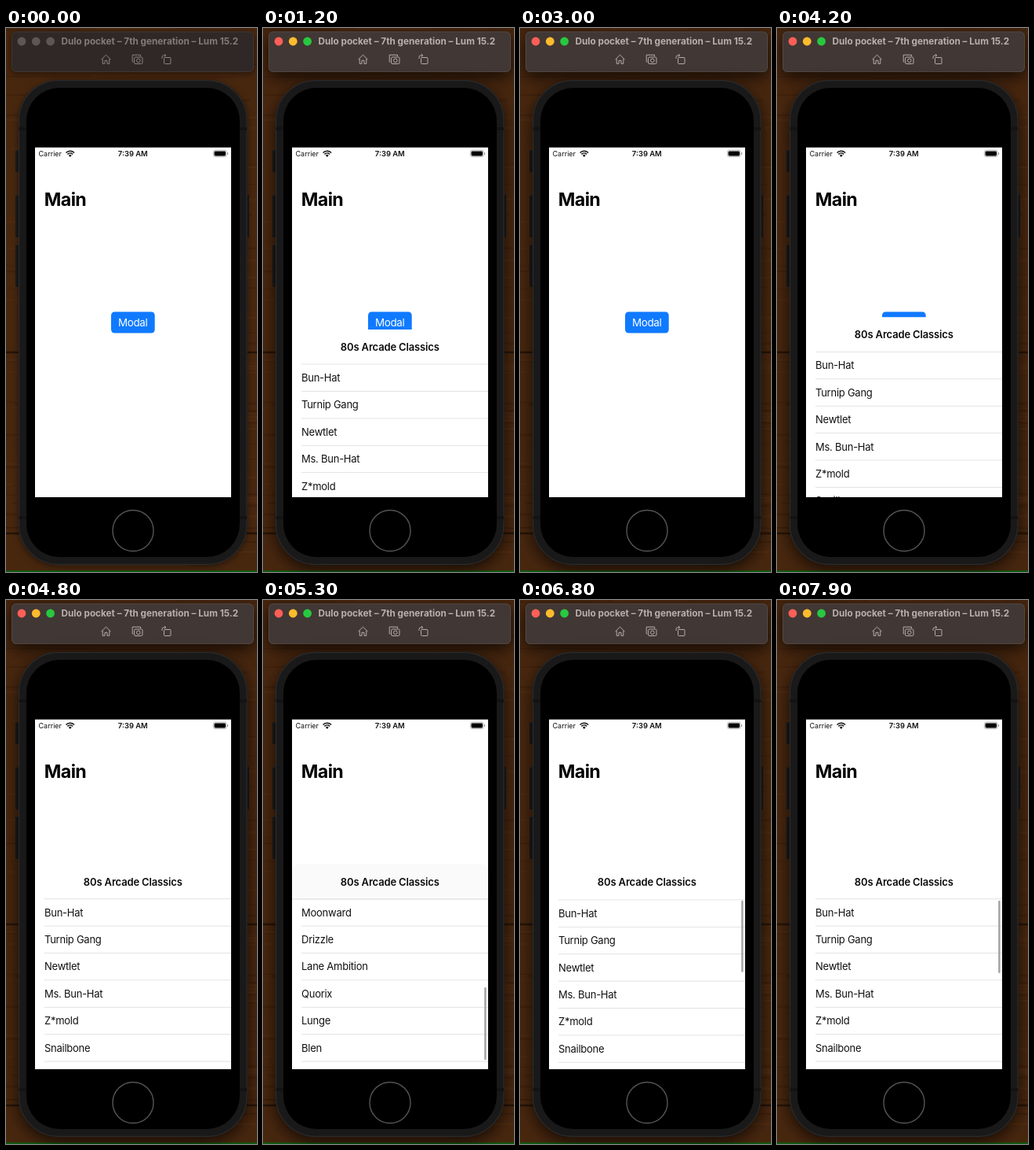
An HTML page with a canvas for the animation above (8 s loop, 320 by 691 pixels).

```html
<!DOCTYPE html>
<html lang="en">
<head>
<meta charset="utf-8">
<title>Modal sheet</title>
<style>
html, body { margin: 0; width: 100%; height: 100%; overflow: hidden; background: #000; }
canvas { display: block; width: 320px; height: 691px; }
</style>
</head>
<body>
<canvas id="stage"></canvas>
<script>
const W = 320, H = 691, LOOP = 8000, STEP = 100;
const SCREEN = { x: 37, y: 151.5, w: 250, h: 444.5 };
const BOTTOM = SCREEN.y + SCREEN.h;
const SHEET_TOP = 335.5, LIST_TOP = 379.7, ROW = 34.4;
const FONT = 'Inter, "Open Sans", sans-serif';
const ROWS = ['Bun-Hat', 'Turnip Gang', 'Newtlet', 'Ms. Bun-Hat', 'Z*mold', 'Snailbone',
  'Gravel Run', 'Bog Lantern', 'Moonward', 'Drizzle', 'Lane Ambition', 'Quorix', 'Lunge', 'Blen', 'Mud Nub'];
const MAX_SCROLL = ROWS.length * ROW - (BOTTOM - LIST_TOP) + 1;

// [time, list offset]
const SCROLL = [[4900, 0], [5000, 40], [5100, 150], [5200, 231], [5300, 275.2], [5400, 293],
  [5550, MAX_SCROLL], [6000, MAX_SCROLL], [6100, 270], [6200, 200], [6300, 118], [6400, 40],
  [6500, -12], [6600, -7], [6700, -3], [6800, -1.2], [7000, 0]];

const canvas = document.getElementById('stage');
const ratio = window.devicePixelRatio || 1;
canvas.width = W * ratio;
canvas.height = H * ratio;
const c = canvas.getContext('2d');
c.scale(ratio, ratio);

function track(keys, t) {
  if (t <= keys[0][0]) return keys[0][1];
  for (let i = 1; i < keys.length; i++) {
    const [t0, a] = keys[i - 1], [t1, b] = keys[i];
    if (t <= t1) return a + (b - a) * (t - t0) / (t1 - t0);
  }
  return keys[keys.length - 1][1];
}

// Remaining share of a critically damped spring
function spring(ms) {
  const k = Math.max(0, ms) * 0.0104;
  return ms > 680 ? 0 : (1 + k) * Math.exp(-k);
}

function sheetShift(t) {
  const travel = BOTTOM - SHEET_TOP;
  if (t < 2100) return travel * spring(t - 900);
  if (t < 3000) {
    const p = (t - 2100) / 900;
    return travel * p * p * (3 - 2 * p);
  }
  return travel * spring(t - 3850);
}

function box(x, y, w, h, r, fill) {
  c.beginPath();
  c.roundRect(x, y, w, h, r);
  if (fill) { c.fillStyle = fill; c.fill(); }
}

function disc(x, y, r, fill) {
  c.beginPath();
  c.arc(x, y, r, 0, Math.PI * 2);
  c.fillStyle = fill;
  c.fill();
}

function text(str, x, base, size, weight, color, spacing = 0, align = 'left') {
  c.font = `${weight} ${size}px ${FONT}`;
  c.letterSpacing = spacing + 'px';
  c.textAlign = align;
  c.fillStyle = color;
  c.fillText(str, x, base);
}

function line(x0, x1, y, color, width = 0.8) {
  c.fillStyle = color;
  c.fillRect(x0, y - width / 2, x1 - x0, width);
}

function drawWood() {
  c.fillStyle = '#48270f';
  c.fillRect(0, 0, W, H);
  let seed = 7;
  const rand = () => (seed = (seed * 16807) % 2147483647) / 2147483647;
  for (let i = 0; i < 150; i++) {
    const y = rand() * H, x = rand() * W - 80, bend = rand() * 8 - 4;
    c.strokeStyle = rand() < 0.55 ? 'rgba(25,12,4,.16)' : 'rgba(122,72,32,.12)';
    c.lineWidth = 0.8 + rand() * 2.4;
    c.beginPath();
    c.moveTo(x, y);
    c.quadraticCurveTo(x + 70, y + bend, x + 170, y + bend / 2);
    c.stroke();
  }
  for (const y of [412, 642]) line(0, W, y, 'rgba(14,7,3,.6)', 2.5);
  line(0, W, 690, '#0d5f12', 1.8);
}

function withShadow(active, paint) {
  c.save();
  c.shadowColor = active ? 'rgba(0,0,0,.7)' : 'rgba(0,0,0,.5)';
  c.shadowBlur = (active ? 20 : 9) * ratio;
  c.shadowOffsetY = (active ? 6 : 2) * ratio;
  paint();
  c.restore();
}

function drawIcons(color) {
  c.strokeStyle = color;
  c.lineWidth = 1;
  c.lineJoin = 'round';
  // Home
  c.beginPath();
  c.moveTo(121.5, 40); c.lineTo(127.5, 34.2); c.lineTo(133.5, 40);
  c.moveTo(123.2, 39); c.lineTo(123.2, 45.3); c.lineTo(126, 45.3);
  c.lineTo(126, 41.3); c.lineTo(129, 41.3); c.lineTo(129, 45.3);
  c.lineTo(131.8, 45.3); c.lineTo(131.8, 39);
  c.stroke();
  // Screenshot
  c.beginPath();
  c.moveTo(162.3, 43); c.lineTo(161.2, 43); c.lineTo(161.2, 34.2);
  c.lineTo(171.5, 34.2); c.lineTo(171.5, 36);
  c.stroke();
  box(163.6, 37, 10.4, 8.5, 1.5); c.stroke();
  c.beginPath(); c.arc(168.8, 41.3, 2.3, 0, 7); c.stroke();
  // Rotate
  box(201.5, 37.5, 8.5, 8, 1); c.stroke();
  c.beginPath();
  c.moveTo(199, 39); c.lineTo(199, 37); c.quadraticCurveTo(199, 34.8, 201.5, 34.8); c.lineTo(203.5, 34.8);
  c.moveTo(202, 33); c.lineTo(203.8, 34.8); c.lineTo(202, 36.5);
  c.stroke();
}

function drawToolbar(active) {
  withShadow(active, () => box(7, 4.5, 309, 51.5, 6, active ? '#413734' : '#2f2826'));
  box(7.5, 5, 308, 50.5, 5.5);
  c.strokeStyle = active ? '#574d49' : '#423b38';
  c.lineWidth = 0.8;
  c.stroke();
  const lights = active ? ['#fe5f57', '#febb2e', '#28c840'] : ['#5d5653', '#5d5653', '#5d5653'];
  lights.forEach((color, i) => disc(20 + i * 18.3, 17, 5.4, color));
  text('Dulo pocket – 7th generation – Lum 15.2', 70.5, 21.2, 11.75, 700, active ? '#b8b0ad' : '#827b78');
  drawIcons(active ? '#b5adaa' : '#89827f');
}

function drawDevice(active) {
  for (const [x, y, h] of [[12, 155, 28], [12, 212, 54], [12, 275, 54], [305, 211, 55]]) {
    box(x, y, 5, h, 1.5, '#1c1b1c');
    line(x, x + 5, y + 0.5, '#2f2e2f', 0.8);
  }
  withShadow(active, () => box(16, 66, 291.5, 616, 51, '#19191a'));
  box(16.6, 66.6, 290.3, 614.8, 50.4);
  c.strokeStyle = '#2b2b2c';
  c.lineWidth = 1.2;
  c.stroke();
  for (const y of [128, 622]) {
    line(16.5, 26, y, '#131314', 4);
    line(298, 307, y, '#131314', 4);
  }
  box(26, 76, 272, 596, 42, '#000');
  c.beginPath();
  c.arc(162, 638.5, 26, 0, Math.PI * 2);
  c.strokeStyle = '#555556';
  c.lineWidth = 1.4;
  c.stroke();
}

function drawStatus() {
  text('Carrier', 41.5, 163.2, 9, 400, '#111');
  text('7:39 AM', 161.8, 163.2, 9.4, 600, '#111', 0, 'center');
  c.strokeStyle = '#111';
  c.lineWidth = 1.5;
  for (const r of [7.3, 4.7]) {
    c.beginPath();
    c.arc(81.8, 163.6, r, -Math.PI * 0.76, -Math.PI * 0.24);
    c.stroke();
  }
  c.beginPath();
  c.moveTo(81.8, 164);
  c.arc(81.8, 163.6, 2.6, -Math.PI * 0.76, -Math.PI * 0.24);
  c.fillStyle = '#111';
  c.fill();
  box(264.3, 155.3, 17, 8.3, 2.4);
  c.strokeStyle = '#aaa';
  c.lineWidth = 0.8;
  c.stroke();
  box(265.5, 156.5, 14.6, 5.9, 1.4, '#000');
  box(282, 158, 1.2, 3, 0.6, '#aaa');
}

function drawIndicator(offset) {
  const p = Math.max(0, Math.min(1, offset / MAX_SCROLL));
  box(282.2, 381.7 + p * 120.5, 2.4, 92.2 + Math.min(0, offset), 1.2, '#a0a0a0');
}

function drawSheet(t) {
  const shift = sheetShift(t), offset = track(SCROLL, t);
  const right = SCREEN.x + SCREEN.w;
  c.save();
  c.translate(0, shift);
  box(SCREEN.x, SHEET_TOP, SCREEN.w, 280, [9, 9, 0, 0], '#fff');
  c.save();
  c.beginPath();
  c.rect(SCREEN.x, LIST_TOP - 1, SCREEN.w, 240);
  c.clip();
  line(49, right, LIST_TOP - offset, '#dcdcde');
  ROWS.forEach((name, i) => {
    const y = LIST_TOP + i * ROW - offset;
    text(name, 49, y + 21.9, 13, 400, '#111', -0.25);
    line(49, right, y + ROW, '#dcdcde');
  });
  c.restore();
  if (offset > 1) {
    box(SCREEN.x, SHEET_TOP, SCREEN.w, LIST_TOP - SHEET_TOP, [9, 9, 0, 0], '#fafafa');
    line(SCREEN.x, right, LIST_TOP + 0.3, '#cfcfd1');
  }
  text('80s Arcade Classics', 161.8, 362.5, 13, 600, '#0b0b0b', -0.15, 'center');
  if (t >= 5000) drawIndicator(offset);
  c.restore();
}

function drawScreen(t) {
  c.save();
  c.beginPath();
  c.rect(SCREEN.x, SCREEN.y, SCREEN.w, SCREEN.h);
  c.clip();
  c.fillStyle = '#fff';
  c.fillRect(SCREEN.x, SCREEN.y, SCREEN.w, SCREEN.h);
  drawStatus();
  text('Main', 48.8, 226, 23.2, 700, '#000', -0.6);
  box(134, 360.5, 55.7, 27, 4.5, '#107aff');
  text('Modal', 161.7, 378.8, 13.4, 400, '#fff', -0.3, 'center');
  drawSheet(t);
  c.restore();
}

function draw(t) {
  const active = t >= 900;
  drawWood();
  drawToolbar(active);
  drawDevice(active);
  drawScreen(t);
}

const start = performance.now();
let shown = -1;
function tick() {
  const t = Math.floor(((performance.now() - start) % LOOP) / STEP) * STEP;
  if (t !== shown) {
    shown = t;
    draw(t);
  }
  requestAnimationFrame(tick);
}
draw(0);
requestAnimationFrame(tick);
</script>
</body>
</html>
```
